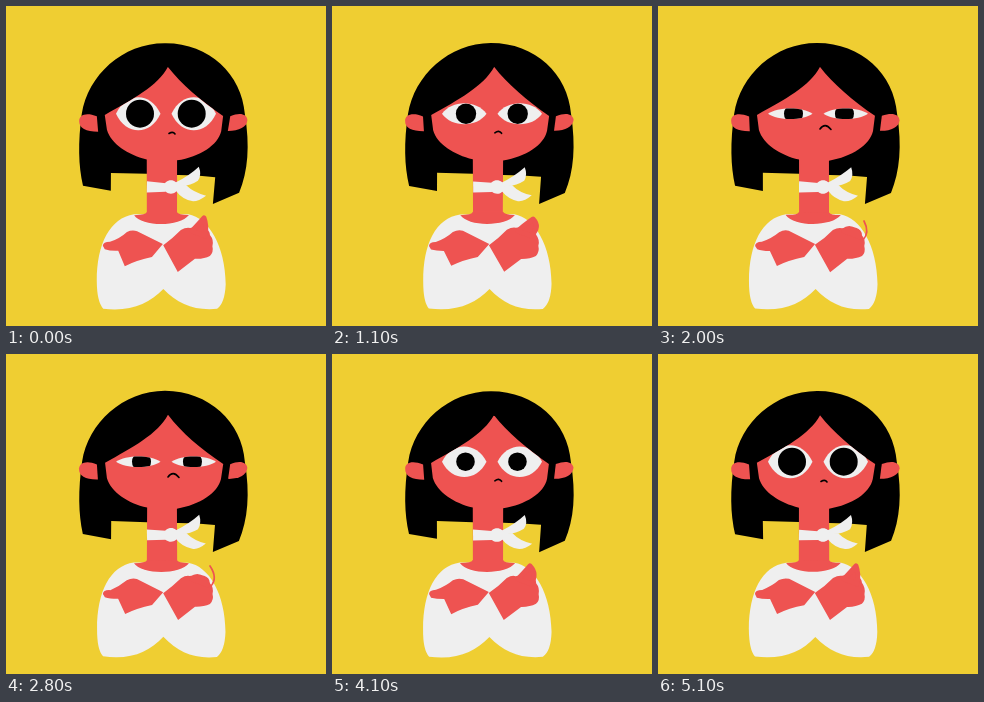
These frames come from a looping animation (320 by 320 pixels, 5200 ms). An HTML page with a canvas:

```html
<!DOCTYPE html>
<html lang="en">
<head>
<meta charset="utf-8">
<title>Second thoughts</title>
<style>
  html, body { margin: 0; width: 100%; height: 100%; overflow: hidden; background: #efce32; }
  canvas { display: block; width: 100vw; height: 100vh; }
</style>
</head>
<body>
<canvas id="stage"></canvas>
<script>
const LOOP = 5200, STEP = 100;
const RED = '#ee5351', WHITE = '#efefef', BLACK = '#000', YELLOW = '#efce32';
const canvas = document.getElementById('stage');
const ctx = canvas.getContext('2d');

const SHAPES = {
  hair: 'M77 180 Q70 150 76 108 C82 69 117 37 159 37 C203 37 236 68 239 108 C244 140 242 165 233 187 L207 198 L209 171 Q190 169 171 169 L141 168 L105 167 L105 185 Z',
  face: 'M162 61 C152 80 126 94 99 109 L101 124 C105 138 122 149 141 153.5 L141 212 L171 212 L171 154.5 C194 151 212 139 215 125 L217 110 C195 95 175 78 162 61 Z',
  leftEar: 'M91 110.5 C80 106 73 109 73 115 C73 122 80 125.5 92 125.5 Z',
  rightEar: 'M224 110 C234 106 241 108 241.5 114 C241 121 233 125 222 125 Z',
  body: 'M128 208.5 C104 212 91 238 91 275 Q91 296 97 302.5 C125 306 143 298 157.5 283 C172 298 188 305 211 303 Q219 297 219.5 278 C219 240 203 212 182 208.5 Z',
  neckline: 'M128 209 Q140 209 141 206 L171 206 Q172 209 183 209 C174 221 136 221 128 209 Z',
  band: 'M141 175.5 L160 177 L160 186 L141 186.5 Z',
  knot: 'M158 181 C158 172 172 172 172 181 C172 190 158 190 158 181 Z',
  upperTail: 'M169 177 Q183 170 193 161 Q196 169 192 175 Q184 180 176 180 L170 183 Z',
  lowerTail: 'M169 180 L180 179 Q188 187 200 189.5 Q192 196 186 195 Q176 193 170 185 Z',
  leftArm: 'M97 240 Q97 236 104 236 Q114 232 121 226 Q126 223.5 131 225 L157 238 L146 251 Q131 254 119 260 L112 245 Q104 245 99 243.5 Z',
  rightArm: 'M157 239 Q166 233 175 224 Q180 221 184 222 Q192 220 198 222 Q204 224 204 229 Q208 234 206.5 240 Q208 246 204 250 Q198 253 189 253 L172 266 Z'
};

// time, lid height, pupil radius, pupil shift, frown, thumb tip x, thumb tip y
const POSES = [
  [0, 16.5, 14, 0, 0, 198, 212],
  [800, 16.5, 14, 0, 0, 198, 212],
  [1100, 10.5, 10.2, 0, .15, 201, 213],
  [1300, 5.3, 9.5, 1.5, 1, 197, 225],
  [3700, 5.3, 9.5, 1.5, 1, 197, 225],
  [4100, 15.3, 9.3, -.5, .15, 198, 212],
  [4400, 16.5, 14, 0, 0, 198, 212],
  [LOOP, 16.5, 14, 0, 0, 198, 212]
];

// time, start x, start y, end y of the flick line
const FLICK = [
  [1300, 206, 215, 234],
  [2000, 206, 215, 234],
  [2800, 204, 212, 232],
  [3600, 209, 224, 235]
];

function sample(rows, t) {
  const i = Math.max(1, rows.findIndex(r => r[0] >= t));
  const a = rows[i - 1], b = rows[i];
  const k = (t - a[0]) / (b[0] - a[0]);
  return a.slice(1).map((v, j) => v + (b[j + 1] - v) * k);
}

function noise(n) {
  const s = Math.sin(n * 12.9898) * 43758.5453;
  return s - Math.floor(s) - .5;
}

// Small hand-drawn wobble on every point
function wobble(d, seed) {
  let n = seed * 97;
  return d.replace(/\d+(\.\d+)?/g, v => (+v + noise(++n) * .5).toFixed(2));
}

function fill(d, color) {
  ctx.fillStyle = color;
  ctx.fill(new Path2D(d));
}

function stroke(d, color, width) {
  ctx.strokeStyle = color;
  ctx.lineWidth = width;
  ctx.stroke(new Path2D(d));
}

function drawEye(left, right, lid, pupilX, radius) {
  const y = 107.7, up = y - lid * 4 / 3, down = y + lid * 4 / 3;
  const lens = new Path2D(
    `M${left} ${y} C${left + 10} ${up} ${right - 10} ${up} ${right} ${y}` +
    `C${right - 10} ${down} ${left + 10} ${down} ${left} ${y}Z`);
  ctx.save();
  ctx.clip(new Path2D(SHAPES.face));
  ctx.fillStyle = WHITE;
  ctx.fill(lens);
  ctx.clip(lens);
  ctx.fillStyle = BLACK;
  ctx.beginPath();
  ctx.arc(pupilX, y, radius, 0, Math.PI * 2);
  ctx.fill();
  ctx.restore();
}

function draw(t) {
  const [lid, radius, shift, frown, tipX, tipY] = sample(POSES, t);
  const seed = t / STEP + 1;
  const part = (name, color) => fill(wobble(SHAPES[name], seed + name.length * 61), color);

  ctx.fillStyle = YELLOW;
  ctx.fillRect(0, 0, 320, 320);

  part('hair', BLACK);
  part('body', WHITE);
  part('face', RED);
  part('neckline', RED);
  part('leftEar', RED);
  part('rightEar', RED);

  drawEye(110, 154.5, lid, 134 + shift, radius);
  drawEye(165.5, 210, lid, 185.7 + shift * .5, radius);

  stroke(`M${163 - frown} ${127.5 - frown * 4.5} Q${167} ${125 - frown * 9} ` +
    `${169 + frown * 4} ${128 - frown * 4.5}`, BLACK, 1.6);

  for (const name of ['band', 'upperTail', 'lowerTail', 'knot']) part(name, WHITE);

  part('leftArm', RED);
  part('rightArm', RED);

  const bulge = 3 + Math.min(frown * 30, 5);
  const thumb = `M186 225 Q191 220 ${tipX} ${tipY} Q${tipX + bulge} ${tipY + 8} 199 230 Z`;
  fill(thumb, RED);
  stroke(thumb, RED, 5);

  if (t >= 1300 && t <= 3600) {
    const [x, y, endY] = sample(FLICK, t);
    stroke(`M${x} ${y} Q212 ${(y + endY) / 2 + 2} 205 ${endY}`, RED, 1.7);
  }
}

function resize() {
  const ratio = window.devicePixelRatio || 1;
  canvas.width = Math.round(innerWidth * ratio);
  canvas.height = Math.round(innerHeight * ratio);
  ctx.setTransform(canvas.width / 320, 0, 0, canvas.height / 320, 0, 0);
  ctx.lineCap = ctx.lineJoin = 'round';
}

let start;
function tick(now) {
  start ??= now;
  draw(Math.floor((now - start) % LOOP / STEP) * STEP);
  requestAnimationFrame(tick);
}

addEventListener('resize', resize);
resize();
draw(0);
requestAnimationFrame(tick);
</script>
</body>
</html>
```
